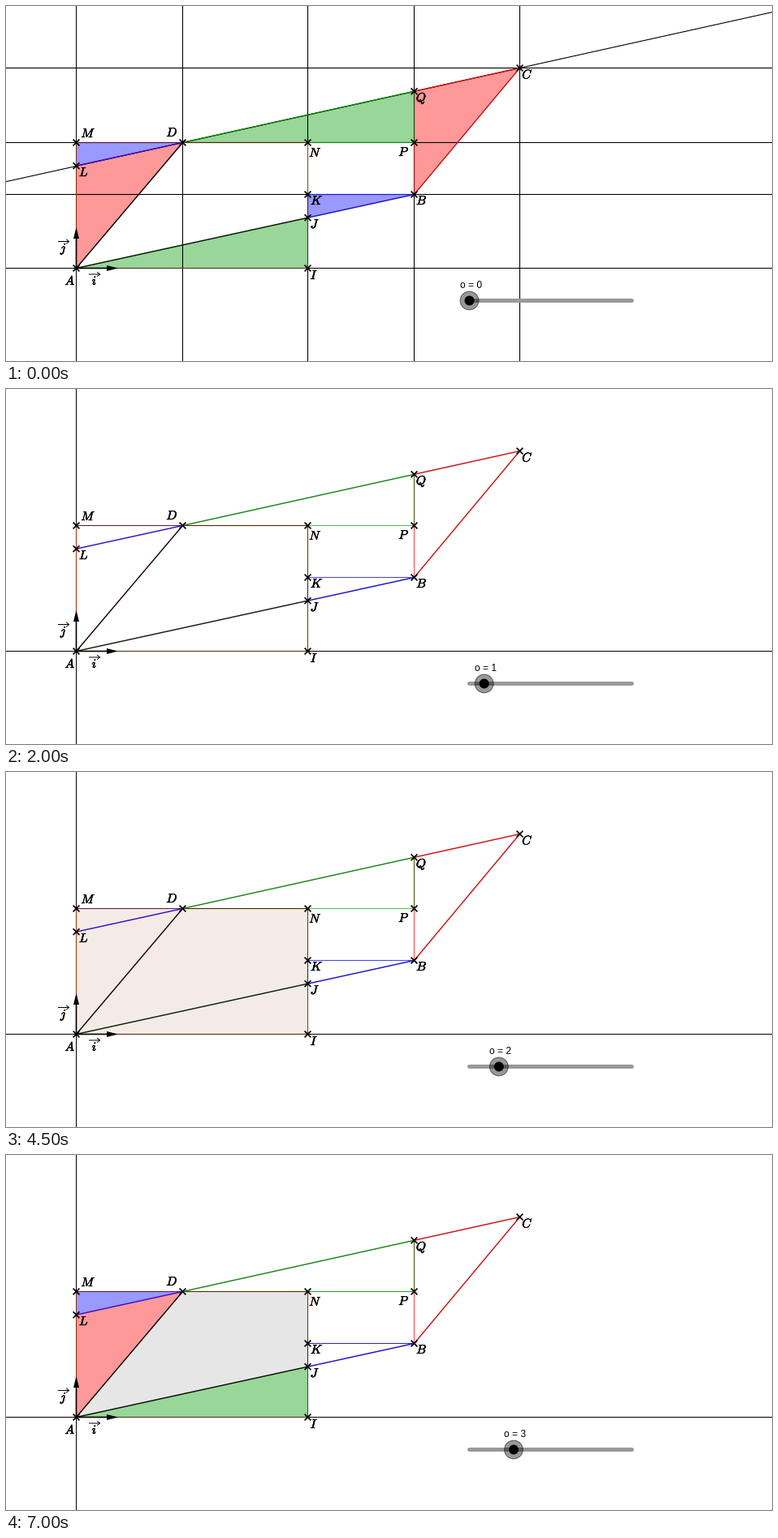
Write a matplotlib script that moves like this. It is 943x438 px and loops after 8 s.

```python
import matplotlib.pyplot as plt
from matplotlib.animation import FuncAnimation
from matplotlib.patches import Circle, Polygon
from matplotlib.patheffects import withStroke

W, H, DPI = 943, 438, 100
PX = 72 / DPI  # points per pixel

plt.rcParams["mathtext.fontset"] = "cm"
plt.rcParams["toolbar"] = "None"

# pixel centres of the construction lines
X0, X1, X2, X3, X4 = 86.5, 217.5, 371.5, 502.5, 632.5
Y0, Y1, Y2, Y3 = 323.5, 232.5, 168.5, 76.5

POINTS = {
    "A": (X0, Y0), "I": (X2, Y0), "J": (X2, 261.2), "K": (X2, Y1),
    "B": (X3, Y1), "P": (X3, Y2), "N": (X2, Y2), "D": (X1, Y2),
    "M": (X0, Y2), "L": (X0, 197.2), "Q": (X3, 105.3), "C": (X4, Y3),
}

# centre x and baseline y of each name
LABELS = {
    "A": (79, 344), "I": (379.5, 337), "J": (380.5, 274), "K": (383, 245),
    "B": (512, 245), "P": (490, 185), "N": (381, 186), "D": (204.5, 161),
    "M": (101.5, 162), "L": (96, 210), "Q": (511.5, 118), "C": (642, 89.5),
}

RED, BLUE, GREEN = "#ff9999", "#9999ff", "#99d699"
LEFT_PARTS = [("MLD", BLUE), ("LAD", RED), ("AJI", GREEN)]
FILLS = {
    0: LEFT_PARTS + [("DPQ", GREEN), ("KJB", BLUE), ("BCQ", RED)],
    1: [],
    2: [("AINM", "#f4ebe6")],
    3: LEFT_PARTS + [("ADNJ", "#e6e6e6")],
}

EDGES = {
    "AM": "#b03508", "MD": "#5c2248", "DN": "#4d2b00", "NP": "#5cc05c",
    "PQ": "#4d5a00", "DQ": "#1a851a", "LD": "#3a0cc4", "QC": "#c81414",
    "CB": "#c81414", "PB": "#ff4848", "KB": "#4848ff", "JB": "#1a10c8",
    "NK": "#6b3820", "KJ": "#3c2050", "JI": "#6b4824", "AI": "#553418",
    "AJ": "#0a200a", "AD": "#200000",
}
EDGE_CHANGES = {
    0: {"AM": "#8a3010", "MD": "#5a1a30", "NP": "#1a8a1a", "PQ": "#14500a",
        "PB": "#b01010", "KB": "#1c1cd0", "NK": "#8c5a46", "JI": "#40481c",
        "AD": "#000000", "AJ": "#001400", "DQ": "#0a7d0a"},
    3: {"AM": "#8a3a10", "NP": "#30a030", "KB": "#2828d8", "AD": "#100000",
        "AJ": "#001000", "JI": "#405028"},
}

fig = plt.figure(figsize=(W / DPI, H / DPI), dpi=DPI, facecolor="white")
ax = fig.add_axes([0, 0, 1, 1])


def line(p, q, color="black", width=1.0, **kw):
    ax.plot([p[0], q[0]], [p[1], q[1]], color=color, lw=width * PX,
            snap=False, zorder=2, **kw)


def shape(points, color):
    ax.add_patch(Polygon(points, closed=True, fc=color, ec="none",
                         snap=False, zorder=2))


def disc(center, radius, **kw):
    ax.add_patch(Circle(center, radius, zorder=2, **kw))


def letter(name, x, y):
    ax.text(x, y, f"${name}$", fontsize=15.5 * PX, ha="center", va="baseline",
            path_effects=[withStroke(linewidth=0.55 * PX, foreground="black")])


def draw_grid():
    for x in (X1, X2, X3, X4):
        line((x, 0), (x, H), width=1.1)
    for y in (Y1, Y2, Y3):
        line((0, y), (W, y), width=1.1)
    slope = (Y3 - Y2) / (X4 - X1)
    line((0, Y2 - slope * X1), (W, Y2 + slope * (W - X1)), width=1.1)


def draw_vectors():
    line((X0, Y0), (126, Y0), width=1.6)
    shape([(138, Y0), (124, Y0 - 3.5), (124, Y0 + 3.5)], "black")
    line((X0, Y0), (X0, 285), width=1.6)
    shape([(X0, 273), (X0 - 3.5, 287), (X0 + 3.5, 287)], "black")
    for name, x, y, top in (("i", 109, 344, 331), ("j", 71, 303.5, 290.5)):
        letter(name, x, y)
        tip = (x + 6.5, top)
        line((x - 6.5, top), tip, width=1)
        for dy in (-2.5, 2.5):
            line((tip[0] - 3, top + dy), tip, width=0.9)


def draw_points():
    for name, (x, y) in POINTS.items():
        for s in (-1, 1):
            line((x - 3.3, y - 3.3 * s), (x + 3.3, y + 3.3 * s), width=1.7)
        letter(name, *LABELS[name])


def draw_slider(step):
    x, y = 570.5 + 18.15 * step, 363.5
    line((570.5, y), (770.5, y), "#999999", 5, solid_capstyle="round")
    disc((x, y), 11.8, fc=(0, 0, 0, 0.4), ec="none")
    disc((x, y), 11.3, fc="none", ec=(0, 0, 0, 0.4), lw=PX)
    disc((x, y), 6, fc="black", ec="none")
    ax.text(x - 11.5, 348, f"o = {step}", fontsize=12 * PX,
            family="Liberation Sans", ha="left", va="baseline")


def draw(frame):
    step = (frame + 4) // 5
    ax.clear()
    ax.set_xlim(0, W)
    ax.set_ylim(H, 0)
    ax.axis("off")
    for names, color in FILLS[step]:
        shape([POINTS[n] for n in names], color)
    if step == 0:
        draw_grid()
    line((X0, 0), (X0, H))
    line((0, Y0), (W, Y0))
    for (a, b), color in (EDGES | EDGE_CHANGES.get(step, {})).items():
        p, q = POINTS[a], POINTS[b]
        slanted = p[0] != q[0] and p[1] != q[1]
        line(p, q, color, 1.45 if slanted else 1.1)
    draw_vectors()
    draw_points()
    draw_slider(step)
    return []


anim = FuncAnimation(fig, draw, frames=16, interval=500, init_func=lambda: [],
                     repeat=True, repeat_delay=0, blit=False)
plt.show()
```
